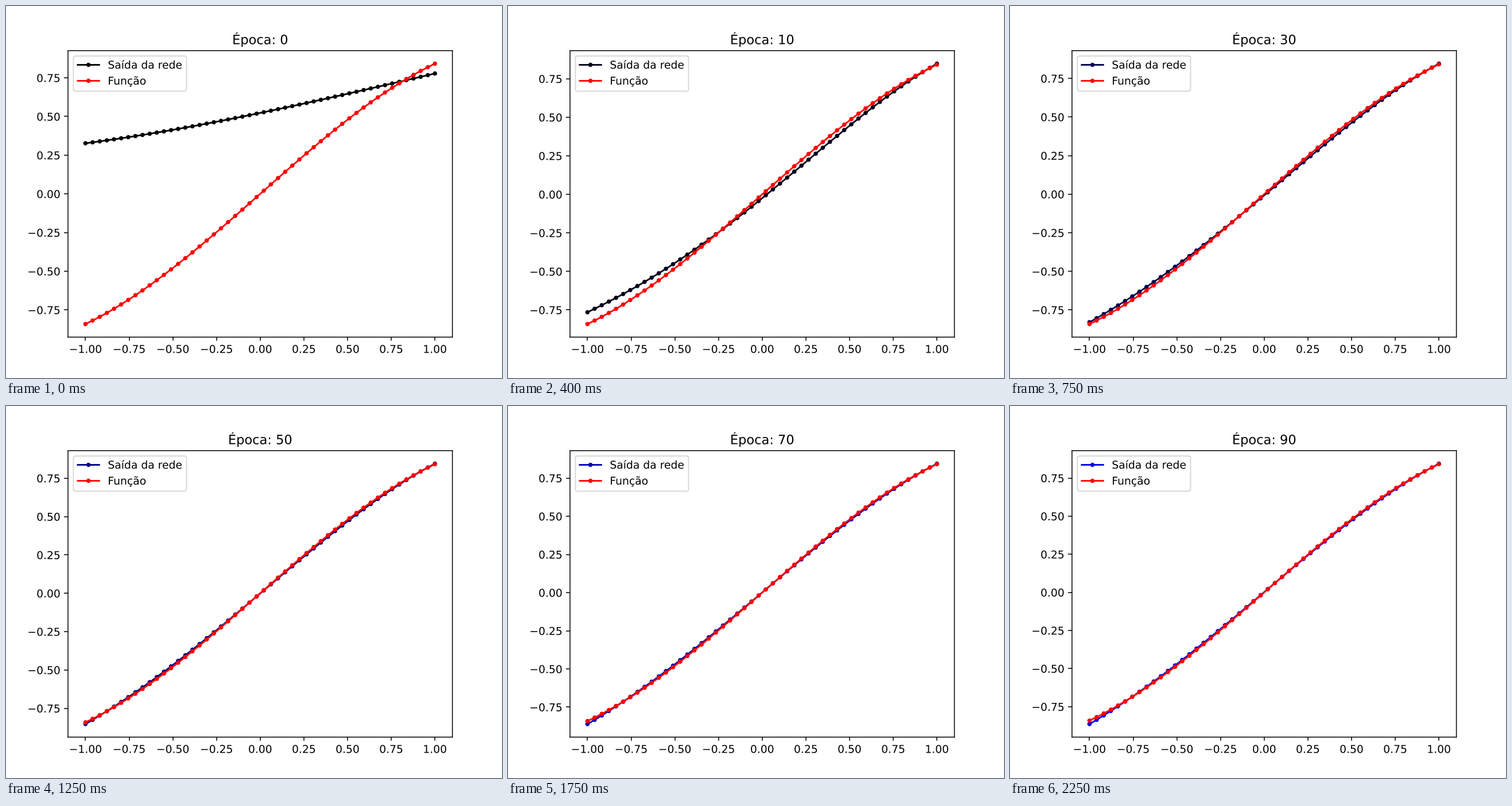
A matplotlib script that plays this animation: 864 by 648 pixels, repeating every 2.5 s.

```python
import numpy as np
import matplotlib.pyplot as plt
from matplotlib import patheffects
from matplotlib.animation import FuncAnimation

STEP = 10        # epochs between two snapshots
EPOCHS = 100
DECAY = 0.6      # share of the error left after each snapshot

# Draw text and markers as paths, at sub-pixel positions.
plt.rcParams.update({
    "path.effects": [patheffects.Normal()],
    "path.snap": False,
    "text.hinting": "none",
})

x = np.linspace(-1, 1, 50)
target = np.sin(x)

untrained = 0.523 + 0.2355 * x + 0.0295 * x**2 - 0.01 * x**3
residual = 0.0022 - 0.0253 * x - 0.0034 * x**2 + 0.039 * x**3 - 0.0095 * x**4
fading = -0.0267 - 0.0538 * x + 0.1121 * x**2 + 0.005 * x**3 - 0.0331 * x**4

fig, ax = plt.subplots(figsize=(6.4, 4.8), dpi=135)


def network_output(snapshot):
    """Start from the untrained net, then approach the target exponentially."""
    if snapshot == 0:
        return untrained
    return target + residual + fading * DECAY ** (snapshot - 1)


def draw(snapshot):
    epoch = snapshot * STEP
    ax.clear()
    ax.plot(x, network_output(snapshot), ".-",
            color=(0, 0, epoch / EPOCHS), label="Saída da rede")
    ax.plot(x, target, ".-", color="red", label="Função")
    ax.set_title(f"Época: {epoch}")
    ax.legend(loc="upper left")
    return ax.get_children()


anim = FuncAnimation(fig, draw, frames=EPOCHS // STEP, init_func=lambda: draw(0),
                     interval=250, repeat=True, repeat_delay=0)
plt.show()
```
